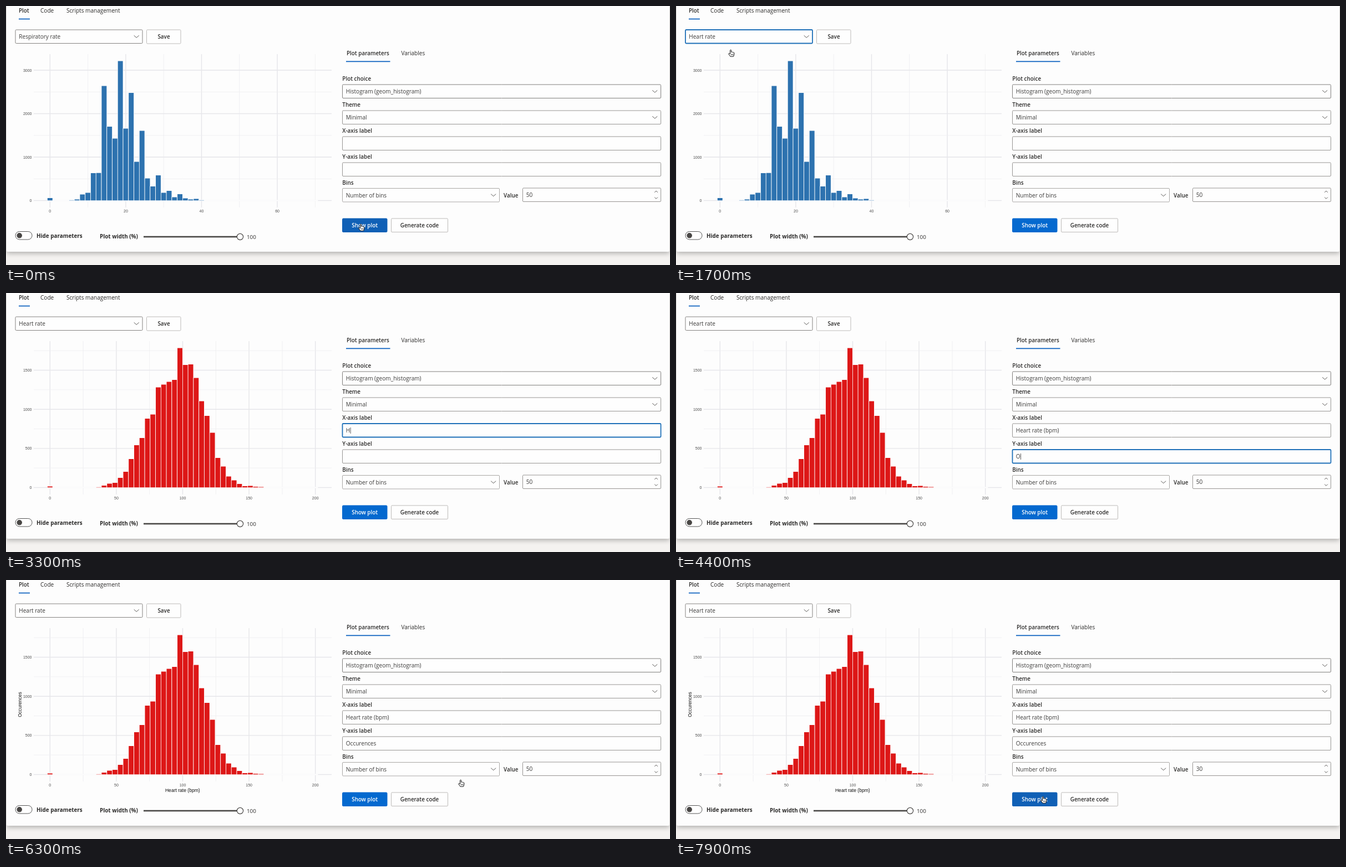
Recreate the animation shown at these times as an HTML page with a canvas. Size 1197 by 468 pixels, loop 8000 ms.

```html
<!DOCTYPE html>
<html lang="en">
<head>
<meta charset="utf-8">
<title>Plot editor</title>
<style>
html, body { margin: 0; width: 100%; height: 100%; overflow: hidden; background: #f4f2f0; }
canvas { display: block; }
</style>
</head>
<body>
<canvas id="stage" width="1197" height="468"></canvas>
<script>
const ctx = document.getElementById('stage').getContext('2d');
const LOOP = 8000, STEP = 100;
const UI = '"Open Sans", "Noto Sans", sans-serif';
const CHART = '"Liberation Sans", Arial, sans-serif';
const INK = '#2b2a29', FOCUS = '#1f70b8', CARD = '#fdfdfd';
const BASE = 351.5, LEFT = 79.3, BAR = 9.76;

// Bar heights in pixels, starting at bin `first`; bin 0 holds the zeros.
const plots = [
  { color: '#2d72af', zero: 4.5, first: 4, xStep: 10, xPx: 6.83, yStep: 500, yPx: .0785, xMax: 70, yMax: 3000,
    bars: [.6, 2, 11, 14, 49.5, 49.8, 207, 133.5, 112, 252, 130, 194.5, 70, 126, 40, 25.5, 45.5, 14, 17.5, 6, 11.5, 4, 2, 3, .6] },
  { color: '#dd1717', zero: 2, first: 9, xStep: 25, xPx: 2.392, yStep: 250, yPx: .1413, xMax: 200, yMax: 1750,
    bars: [.6, 3.5, 7, 8.5, 17.5, 28.5, 51.5, 76.5, 89.5, 124.5, 132, 181, 186, 191, 194.5, 252, 221.5, 222.5, 198,
      156, 129.5, 99, 53.5, 38, 20, 13, 6.5, 2.5, 3, 1.5, 1] }
];

// Pointer stops: time, x, y
const path = [
  [0, 641, 400], [300, 641, 400], [900, 126, 58], [1300, 126, 58], [1600, 100, 85], [1700, 100, 85],
  [2200, 663, 397], [2500, 663, 397], [3000, 720, 248], [5100, 720, 248], [5500, 642, 391],
  [5700, 643, 397], [6000, 643, 397], [6600, 999, 337], [7300, 999, 337], [7700, 663, 397], [LOOP, 663, 397]
];
const hand = new Path2D('M-2.4-5.2q1-1.6 2 0V-1.7q1-.8 1.9.2q1.1-.6 1.8.4q1.3-.3 1.5 1V2.6L3.6 6.2H-2L-5.3 1.6q.3-1.6 1.7-.8L-2.4 2Z');
const knuckles = new Path2D('M-.4 1.6V4M1.2 1.6V4M2.8 1.6V4');
const fields = [[606.5, 236, 574, 24.5], [606.5, 283, 574, 24.5], [931.5, 329, 249, 24.5]];
const button = [606.5, 384, 80.5, 24.5];

const between = (t, a, b) => t >= a && t < b;
const inside = ([px, py], [x, y, w, h]) => px >= x && px <= x + w && py >= y && py <= y + h;

function pointer(t) {
  if (t <= 0) return path[0].slice(1);
  const i = path.findIndex(p => p[0] >= t);
  const [t0, x0, y0] = path[i - 1], [t1, x1, y1] = path[i];
  const u = (t - t0) / (t1 - t0), k = u * u * (3 - 2 * u);
  return [x0 + (x1 - x0) * k, y0 + (y1 - y0) * k];
}

function text(str, x, y, { size = 10.05, weight = 400, color = INK, align = 'left', font = UI } = {}) {
  ctx.font = `${weight} ${size}px ${font}`;
  ctx.fillStyle = color;
  ctx.textAlign = align;
  ctx.fillText(str, x, y);
}
const label = (str, x, y, opts) => text(str, x, y, { size: 9.9, weight: 600, ...opts });

function rect(x, y, w, h, color) {
  ctx.fillStyle = color;
  ctx.fillRect(x, y, w, h);
}

function line(points, color, width) {
  ctx.beginPath();
  points.forEach(p => ctx.lineTo(...p));
  ctx.strokeStyle = color;
  ctx.lineWidth = width;
  ctx.stroke();
}

function box([x, y, w, h], { stroke = '#979593', fill = '#fefefe', focus = false, radius = 1.5 } = {}) {
  ctx.beginPath();
  ctx.roundRect(x, y, w, h, radius);
  ctx.fillStyle = fill;
  ctx.fill();
  ctx.strokeStyle = focus ? FOCUS : stroke;
  ctx.lineWidth = focus ? 1.8 : 1;
  ctx.stroke();
}

const chevron = (x, y, w = 4.5, h = 4) =>
  line([[x - w, y - h / 2], [x, y + h / 2], [x + w, y - h / 2]], '#5c5a58', 1);

function select(area, value, opts) {
  const [x, y, w, h] = area;
  box(area, opts);
  text(value, x + 6.3, y + h / 2 + 3.8, { color: '#3b3a39' });
  chevron(x + w - 10.8, y + h / 2);
}

function input(area, value, focus, sinceKey) {
  const [x, y, w, h] = area;
  box(area, { focus });
  text(value, x + 6.3, y + h / 2 + 3.8, { color: '#3b3a39' });
  if (focus && sinceKey % 1000 < 500) {
    rect(x + 6.8 + ctx.measureText(value).width, y + 7, .8, 11, '#333');
  }
}

function typed(str, t, start, end) {
  const n = t < start ? 0 : 1 + Math.floor((t - start) / (end - start) * (str.length - 1));
  return str.slice(0, n);
}

function knob(x, y, r, fill) {
  ctx.beginPath();
  ctx.arc(x, y, r, 0, 7);
  ctx.fillStyle = fill;
  ctx.fill();
  ctx.strokeStyle = '#484644';
  ctx.lineWidth = 1.2;
  ctx.stroke();
}

function drawCard() {
  rect(0, 0, 1197, 468, '#f4f2f0');
  ctx.save();
  ctx.shadowColor = 'rgba(0,0,0,.28)';
  ctx.shadowBlur = 9;
  ctx.shadowOffsetY = 3;
  ctx.beginPath();
  ctx.roundRect(1, -20, 1195, 464, 2);
  ctx.fillStyle = CARD;
  ctx.fill();
  ctx.restore();
}

function drawPlot({ color, zero, first, bars, xStep, xPx, yStep, yPx, xMax, yMax }, named) {
  const tick = { size: 7, font: CHART, color: '#4d4d4d' };
  const title = { size: 8.55, font: CHART, color: '#111', align: 'center' };
  const grid = (points, major) => line(points, major ? '#e6e6ea' : '#eeeef0', major ? 1.4 : .8);

  for (let v = 0, i = 0; v <= xMax; v += xStep, i++) {
    const x = LEFT + v * xPx;
    grid([[x, 87], [x, 364]], i % 2 === 0);
    if (i % 2 === 0) text(v, x, 373, { ...tick, align: 'center' });
  }
  for (let v = 0, i = 0; v <= yMax; v += yStep, i++) {
    const y = BASE - v * yPx;
    grid([[50, y], [587, y]], i % 2 === 0);
    if (i % 2 === 0) text(v, 46.5, y + 2.6, { ...tick, align: 'right' });
  }

  // Empty bins leave a white outline along the baseline.
  const start = LEFT - BAR / 2;
  rect(start, BASE - 1, BAR * 50, 2, CARD);
  const bar = (i, h) => {
    rect(start + i * BAR - .4, BASE - h - .6, BAR + .8, h + .6, '#fff');
    rect(start + i * BAR + .4, BASE - h, BAR - .8, h - .2, color);
  };
  bar(0, zero);
  bars.forEach((h, i) => bar(first + i, h));

  if (!named) return;
  text('Heart rate (bpm)', 318.3, 382.5, title);
  ctx.save();
  ctx.translate(27.5, 225);
  ctx.rotate(-Math.PI / 2);
  text('Occurences', 0, 0, title);
  ctx.restore();
}

function drawLeft(t) {
  label('Plot', 23, 12);
  text('Code', 62, 12);
  text('Scripts management', 109, 12);
  rect(23, 22.6, 20, 1.8, '#1265c0');

  select([17, 43, 229, 24.5], t < 1700 ? 'Respiratory rate' : 'Heart rate',
    { stroke: '#858381', focus: between(t, 1300, 2400) });
  box([253.5, 43, 61.5, 25], { stroke: '#bdbbb9' });
  label('Save', 284.5, 59.3, { align: 'center' });

  drawPlot(plots[t < 2600 ? 0 : 1], t >= 6000);

  box([17, 407.5, 30, 14.5], { stroke: '#555', radius: 7.25 });
  knob(24.2, 414.8, 4.2, '#484644');
  label('Hide parameters', 55, 419, { weight: 700 });
  label('Plot width (%)', 169, 420, { weight: 700 });
  rect(248, 415.7, 170, 2.6, '#484644');
  knob(422, 417, 5.6, '#fff');
  text('100', 434, 421, { size: 9.8 });
}

function drawRight(t) {
  label('Plot parameters', 614, 88.7);
  text('Variables', 712.5, 88.7);
  rect(613, 99.4, 79.5, 1.8, '#1265c0');
  ['Plot choice', 'Theme', 'X-axis label', 'Y-axis label', 'Bins']
    .forEach((str, i) => label(str, 606.3, 135 + i * 47));

  select([606.5, 142, 574, 24.5], 'Histogram (geom_histogram)', { stroke: '#807e7c' });
  select([606.5, 189, 574, 24.5], 'Minimal');
  input(fields[0], typed('Heart rate (bpm)', t, 3300, 4200), between(t, 3000, 4400), t > 4200 ? t - 4200 : 0);
  input(fields[1], typed('Occurences', t, 4400, 5000), between(t, 4400, 5700), t > 5000 ? t - 5000 : 0);
  select([606.5, 329.5, 283, 24.5], 'Number of bins', { stroke: '#a9a7a5' });
  label('Value', 897, 345.5);
  input(fields[2], t < 6900 ? '50' : typed('30', t, 7000, 7100), between(t, 6700, 7800), t > 7100 ? t - 7100 : 0);
  chevron(1172, 335.5, 2.8, -2.8);
  chevron(1172, 347, 2.8, 2.8);

  const fill = inside(pointer(t - STEP), button) ? '#1060b6' : '#0469cf';
  box(button, { fill, stroke: fill });
  label('Show plot', 646.7, 400.3, { color: '#fff', align: 'center' });
  box([694.5, 384, 102, 24.5], { stroke: '#bdbbb9' });
  label('Generate code', 745.5, 400.3, { align: 'center' });
}

function drawPointer(t) {
  if (between(t, 3200, 5200)) return;
  const at = pointer(t);
  ctx.save();
  ctx.translate(...at);
  if (fields.some(f => inside(at, f))) {
    line([[-2.5, -6], [0, -5], [2.5, -6]], '#222', 1);
    line([[0, -5], [0, 5]], '#222', 1.1);
    line([[-2.5, 6], [0, 5], [2.5, 6]], '#222', 1);
  } else {
    ctx.fillStyle = '#fff';
    ctx.strokeStyle = '#111';
    ctx.lineWidth = 1;
    ctx.fill(hand);
    ctx.stroke(hand);
    ctx.lineWidth = .7;
    ctx.stroke(knuckles);
  }
  ctx.restore();
}

function frame() {
  const t = Math.floor(performance.now() % LOOP / STEP) * STEP;
  drawCard();
  drawLeft(t);
  drawRight(t);
  drawPointer(t);
  requestAnimationFrame(frame);
}
frame();
</script>
</body>
</html>
```
